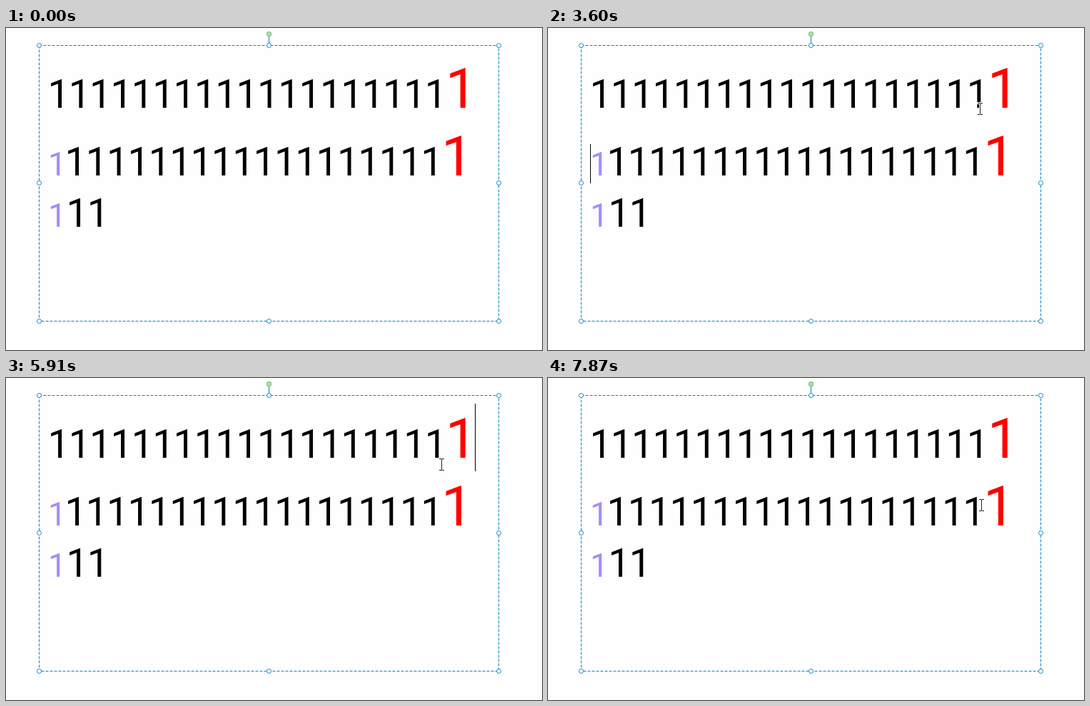
Animation, 751 px wide and 452 px high, one loop 8000 ms. Source, as an HTML page with a canvas:

```html
<!DOCTYPE html>
<html lang="en">
<head>
<meta charset="utf-8">
<title>Text box editing</title>
<style>
html, body { margin: 0; width: 100%; height: 100%; overflow: hidden; background: #fefefe; }
canvas { display: block; }
</style>
</head>
<body>
<canvas id="stage" width="751" height="452"></canvas>
<script>
const ctx = document.getElementById('stage').getContext('2d');
const LOOP = 8000;
const BLUE = '#0a84c1';
const ADVANCE = 29.35;

// Digit styles: colour and ink height in pixels.
const styles = {
  black: { color: '#000', height: 39 },
  red: { color: '#f00', height: 55.8 },
  purple: { color: '#a78bfa', height: 32.4 }
};
for (const style of Object.values(styles)) {
  style.font = `${style.height / 0.711}px Roboto, sans-serif`;
  ctx.font = style.font;
  style.inkRight = ctx.measureText('1').actualBoundingBoxRight;
}

// A run is [style, right edge of the first digit's stem, count].
const firstRow = [112, ['black', 78.4, 19], ['red', 643.8, 1]];
const redStart = [['red', 87.5, 1], ['purple', 118.8, 1]];
const layouts = {
  plain: [
    firstRow,
    [207, ['purple', 75.9, 1], ['black', 102.4, 18], ['red', 638, 1]],
    [279, ['purple', 75.9, 1], ['black', 104.4, 2]]
  ],
  blackTyped: [
    firstRow,
    [184, ['black', 78.4, 1], ['purple', 105.2, 1], ['black', 131.7, 18]],
    [273, ...redStart, ['black', 146.6, 2]]
  ],
  redTyped: [
    firstRow,
    [207, ...redStart, ['black', 145.4, 18]],
    [302, ...redStart, ['black', 146.6, 2]]
  ]
};

// Caret places: [x, top, bottom].
const afterBlack = [615, 59, 125];
const beforeBlack = [586, 59, 125];
const rowTwo = [59, 163, 218];
const afterRed = [657, 36, 131];

// Each state holds until the next one: [time, layout, caret].
const states = [
  [0, 'plain'],
  [740, 'plain', afterBlack],
  [1290, 'plain', beforeBlack],
  [1620, 'plain', afterBlack],
  [2150, 'plain'],
  [2480, 'plain', rowTwo],
  [3070, 'plain'],
  [3600, 'plain', rowTwo],
  [3820, 'blackTyped', [87, 131, 197]],
  [4350, 'blackTyped'],
  [4750, 'plain', afterRed],
  [5350, 'plain'],
  [5910, 'plain', afterRed],
  [6180, 'redTyped', [100, 131, 226]],
  [6710, 'redTyped'],
  [7040, 'plain', afterRed],
  [7570, 'plain']
];

// Mouse path: [time, x, y], linear between points.
const mousePath = [
  [70, 673, 314], [200, 648, 235], [340, 620, 140], [470, 610, 112],
  [1019, 610, 112], [1020, 606, 111], [1089, 606, 111], [1090, 605, 112],
  [3069, 605, 112], [3140, 605, 113], [5549, 605, 113], [5550, 606, 115],
  [5690, 610, 121], [7239, 610, 121], [7240, 610, 124], [7450, 608, 168],
  [7600, 607, 185], [7870, 607, 178]
];

function mouseAt(time) {
  if (time < mousePath[0][0]) return null;
  const next = mousePath.findIndex(point => point[0] > time);
  if (next < 0) return mousePath.at(-1).slice(1);
  const [t0, x0, y0] = mousePath[next - 1];
  const [t1, x1, y1] = mousePath[next];
  const k = (time - t0) / (t1 - t0);
  return [Math.round(x0 + (x1 - x0) * k), Math.round(y0 + (y1 - y0) * k)];
}

function circle(x, y, radius, fill, stroke) {
  ctx.beginPath();
  ctx.arc(x, y, radius, 0, Math.PI * 2);
  ctx.fillStyle = fill;
  ctx.fill();
  ctx.strokeStyle = stroke;
  ctx.stroke();
}

function drawBox() {
  ctx.lineWidth = 1;
  ctx.strokeStyle = BLUE;
  ctx.setLineDash([4, 2]);
  ctx.strokeRect(46.5, 24.5, 644, 387);
  ctx.setLineDash([]);
  ctx.beginPath();
  ctx.moveTo(368.5, 12);
  ctx.lineTo(368.5, 21);
  ctx.stroke();
  for (const x of [46.5, 368.5, 690.5]) {
    for (const y of [24.5, 217.5, 411.5]) {
      if (x !== 368.5 || y !== 217.5) circle(x, y, 3, '#fff', BLUE);
    }
  }
  circle(368.5, 8.5, 3.2, '#b3dfa5', '#6fb36f');
}

function drawRow([baseline, ...runs]) {
  for (const [name, right, count] of runs) {
    const style = styles[name];
    ctx.font = style.font;
    ctx.fillStyle = style.color;
    for (let i = 0; i < count; i++) {
      ctx.fillText('1', right - style.inkRight + i * ADVANCE, baseline);
    }
  }
}

function drawMouse([x, y]) {
  const beam = new Path2D(
    `M${x - 3} ${y - 7.5}h3l.5 1l.5 -1h3M${x + 0.5} ${y - 7}v15` +
    `M${x - 3} ${y + 8.5}h3l.5 -1l.5 1h3`
  );
  ctx.lineCap = 'square';
  ctx.lineWidth = 3;
  ctx.strokeStyle = '#fff';
  ctx.stroke(beam);
  ctx.lineCap = 'butt';
  ctx.lineWidth = 1;
  ctx.strokeStyle = '#222';
  ctx.stroke(beam);
}

function draw(now) {
  const time = now % LOOP;
  const [, layout, caret] = states.findLast(state => state[0] <= time);
  ctx.fillStyle = '#fefefe';
  ctx.fillRect(0, 0, 751, 452);
  drawBox();
  layouts[layout].forEach(drawRow);
  if (caret) {
    const [x, top, bottom] = caret;
    ctx.fillStyle = '#000';
    ctx.fillRect(x, top, 1, bottom - top);
  }
  const mouse = mouseAt(time);
  if (mouse) drawMouse(mouse);
}

let start;
function tick(now) {
  start ??= now;
  draw(Math.max(0, now - start));
  requestAnimationFrame(tick);
}
draw(0);
requestAnimationFrame(tick);
</script>
</body>
</html>
```
